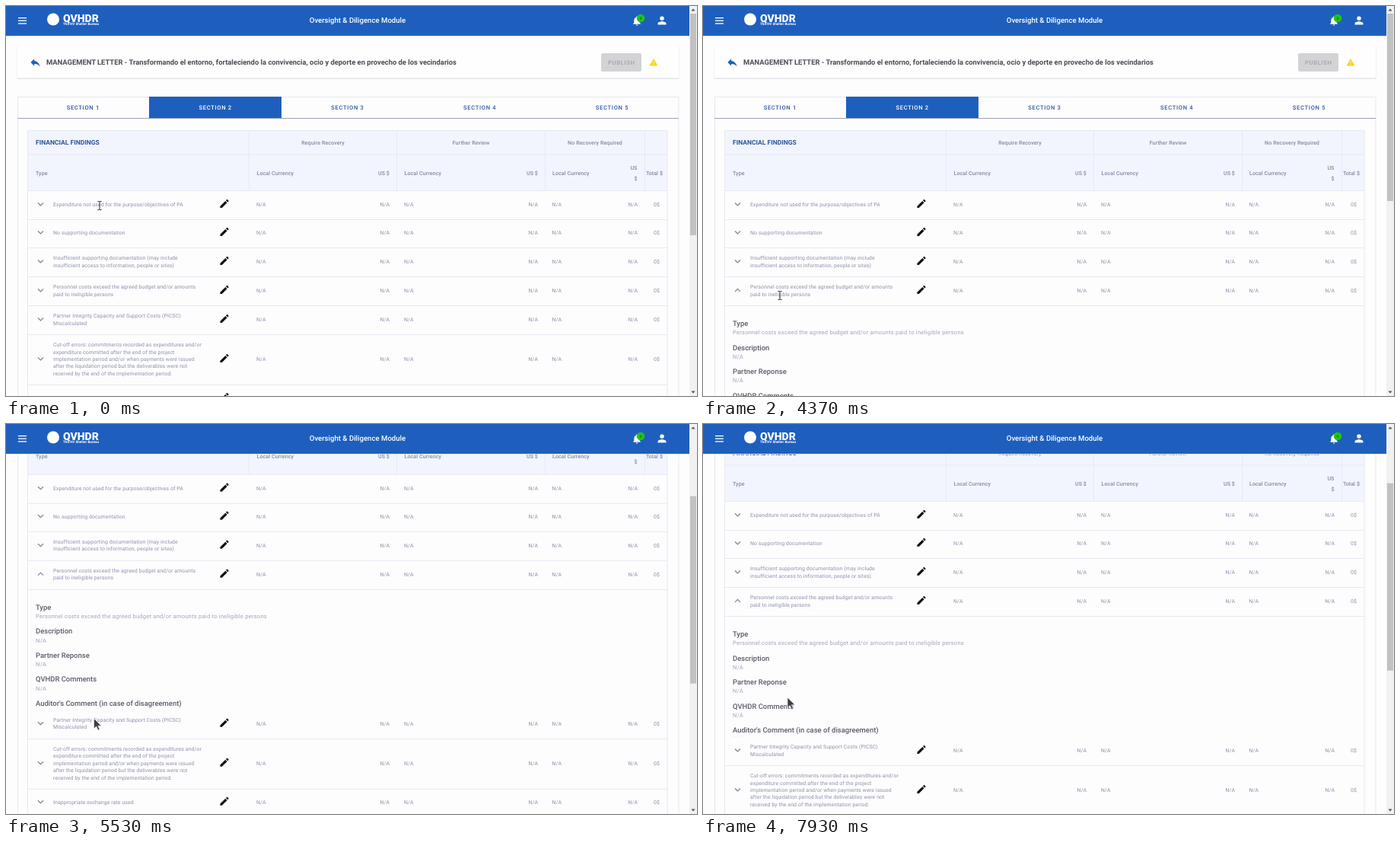
These frames come from a looping animation (908x512 px, 8 s). An HTML page:

```html
<!DOCTYPE html>
<html lang="en">
<head>
<meta charset="utf-8">
<title>Management letter</title>
<style>
  html, body { margin: 0; width: 100%; height: 100%; overflow: hidden; background: #fdfdfe; }
  svg { display: block; width: 908px; height: 512px; font-family: Roboto, sans-serif; text-rendering: geometricPrecision; }
  .cell { font-size: 6.9px; letter-spacing: .016em; fill: #8d90aa; }
  .head { font-size: 7.1px; font-weight: 500; letter-spacing: .012em; fill: #8588a0; }
  .button { font-size: 7.57px; font-weight: 500; letter-spacing: .0892em; }
  .label { font-size: 9.46px; font-weight: 500; fill: #5a5b68; }
  .body { font-size: 7.57px; letter-spacing: .03125em; fill: #a2a5bb; }
  .rule { stroke: #e7e9f1; stroke-width: 1; fill: none; }
  .chevron { stroke: #7c7e92; stroke-width: 1.1; fill: none; }
</style>
</head>
<body>
<svg id="stage" viewBox="0 0 908 512"></svg>
<script>
const LOOP = 8000, DETAIL = 158, BLUE = '#1e5fbe', PAGE = '#fdfdfe';

const text = (x, y, str, cls, attrs = '') =>
  `<text x="${x}" y="${y}" class="${cls}" ${attrs}>${str.replace(/&/g, '&amp;')}</text>`;
const rect = (x, y, w, h, fill, attrs = '') =>
  `<rect x="${x}" y="${y}" width="${w}" height="${h}" fill="${fill}" ${attrs}/>`;
const line = d => `<path class="rule" d="${d}"/>`;
const icon = (x, y, scale, d, fill) =>
  `<path transform="translate(${x} ${y}) scale(${scale}) translate(-12 -12)" d="${d}" fill="${fill}"/>`;
const END = 'text-anchor="end"', MID = 'text-anchor="middle"';

const PENCIL = 'M3 17.2V21h3.8L17.8 9.9l-3.7-3.7zM20.7 7a1 1 0 0 0 0-1.4l-2.3-2.3a1 1 0 0 0-1.4 0l-1.8 1.8 3.7 3.7z';
const REPLY = 'M10 9V5l-7 7 7 7v-4.1c5 0 8.5 1.6 11 5.1-1-5-4-10-11-11z';
const BELL = 'M12 22a2 2 0 0 0 2-2h-4a2 2 0 0 0 2 2zM18 16v-5c0-3-1.6-5.6-4.5-6.3V4a1.5 1.5 0 0 0-3 0v.7C7.6 5.4 6 7.9 6 11v5l-2 2v1h16v-1z';
const PERSON = 'M12 12a4 4 0 1 0 0-8 4 4 0 0 0 0 8zM12 14c-2.7 0-8 1.3-8 4v2h16v-2c0-2.7-5.3-4-8-4z';
const WARNING = 'M1 21h22L12 2zM13 18h-2v-2h2zM13 14h-2v-4h2z';

const rows = [
  [260.5, 280.5, ['Expenditure not used for the purpose/objectives of PA']],
  [297.5, 317.5, ['No supporting documentation']],
  [335.5, 355.5, ['Insufficient supporting documentation (may include', 'insufficient access to information, people or sites)']],
  [373.5, 393.5, ['Personnel costs exceed the agreed budget and/or amounts', 'paid to ineligible persons']],
  [411.5, 431.5, ['Partner Integrity Capacity and Support Costs (PICSC)', 'Miscalculated']],
  [463.5, 497.5, ['Cut-off errors: commitments recorded as expenditures and/or',
    'expenditure committed after the end of the project',
    'implementation period and/or when payments were issued',
    'after the liquidation period but the deliverables were not',
    'received by the end of the implementation period.']],
  [514.5, 534.5, ['Inappropriate exchange rate used']],
];

function row([mid, bottom, lines], i) {
  const base = mid + 2.5;
  return `<path class="chevron" id="chevron${i}" d="M42 ${mid - 2}l3.5 3.5 3.5-3.5"/>`
    + lines.map((s, n) => text(62, base + 9.45 * (n - (lines.length - 1) / 2), s, 'cell')).join('')
    + icon(287, mid - 1, .62, PENCIL, '#101014')
    + [329, 523, 717.5].map(x => text(x, base, 'N/A', 'cell')).join('')
    + [504, 699, 830].map(x => text(x, base, 'N/A', 'cell', END)).join('')
    + text(859, base, '0$', 'cell', END)
    + line(`M28 ${bottom}H869`);
}

function details() {
  const entries = [['Type', 'Personnel costs exceed the agreed budget and/or amounts paid to ineligible persons'],
    ...['Description', 'Partner Reponse', 'QVHDR Comments', "Auditor's Comment (in case of disagreement)"].map(s => [s, 'N/A'])];
  return entries.map(([label, value], i) =>
    text(39, 420 + 31.5 * i, label, 'label') + text(39, 431.4 + 31.5 * i, value, 'body')).join('');
}

function titleCard() {
  return rect(14.5, 53, 870, 43, '#e4e5ea', 'rx="2"') + rect(15, 53, 869, 41.5, '#fefefe', 'rx="2"')
    + icon(38.5, 74, .67, REPLY, BLUE)
    + text(53, 77, 'MANAGEMENT LETTER - Transformando el entorno, fortaleciendo la convivencia, ocio y deporte en provecho de los vecindarios',
      '', 'font-size="9.4" font-weight="700" fill="#4b4c56"')
    + rect(782, 62, 53, 24, '#d3d3d6', 'rx="2"')
    + text(808.8, 76.8, 'PUBLISH', 'button', MID + ' fill="#a3a4a8"')
    + icon(851, 74, .5, WARNING, '#fbd418');
}

function tabs() {
  const width = 173.8;
  return line('M15.5 119V900M884 119V900M15 119.5H884') + rect(188, 119, 174, 28, BLUE)
    + [1, 2, 3, 4, 5].map(n => text(101.3 + width * (n - 1), 136, 'SECTION ' + n, 'button',
      `${MID} fill="${n === 2 ? '#fff' : '#34589c'}"`)).join('')
    + rect(15, 147, 869, 1, '#9ea2b0');
}

function tableHead() {
  const at = (x, y, s, attrs) => text(x, y, s, 'head', attrs);
  return rect(28, 163, 841, 79.5, '#f2f5fd')
    + line('M28.5 900V163.5H869V900M28 195H869M28 242.5H869M319.5 163V242M513.5 163V242M708.5 163V242M839.5 163V242')
    + text(39, 182, 'FINANCIAL FINDINGS', '', 'font-size="8.5" font-weight="700" fill="#2c559e"')
    + at(416.5, 181.5, 'Require Recovery', MID) + at(611, 181.5, 'Further Review', MID) + at(774, 181.5, 'No Recovery Required', MID)
    + at(39, 221.5, 'Type') + [329.5, 523.5, 718].map(x => at(x, 221.5, 'Local Currency')).join('')
    + at(504, 221.5, 'US $', END) + at(699, 221.5, 'US $', END)
    + at(829.5, 214.5, 'US', END) + at(829.5, 228.5, '$', END) + at(863, 221.5, 'Total $', END);
}

function appBar() {
  return rect(0, 39, 898, 1, '#d9dde8') + rect(0, 0, 898, 39, BLUE)
    + [15, 18.7, 22.4].map(y => rect(16, y, 11, 1.3, '#fff')).join('')
    + '<circle cx="62" cy="17.5" r="8" fill="#fff"/>'
    + text(75, 20.5, 'QVHDR', '', 'font-size="14" font-weight="900" fill="#fff"')
    + text(75, 25.3, 'The HV Shelter Bureau', '', 'font-size="4.6" font-weight="700" fill="#fff"')
    + text(462, 22.2, 'Oversight & Diligence Module', '', MID + ' font-size="9.6" font-weight="500" fill="#fff"')
    + icon(829, 19.5, .62, BELL, '#fff') + '<circle cx="834" cy="16" r="5.3" fill="#20c414"/>'
    + text(834, 18, '6', '', MID + ' font-size="5.5" fill="#0d6b1a"')
    + icon(862, 19, .68, PERSON, '#fff');
}

document.getElementById('stage').innerHTML = `
  <defs><clipPath id="reveal"><rect id="revealBox" x="28" y="394" width="841" height="0"/></clipPath></defs>
  ${rect(0, 0, 908, 512, PAGE)}
  <g id="page">
    ${titleCard()}${tabs()}${tableHead()}
    ${rows.slice(0, 4).map(row).join('')}
    <g clip-path="url(#reveal)">${details()}</g>
    <g id="lower">${rows.slice(4).map((r, i) => row(r, i + 4)).join('')}</g>
  </g>
  ${appBar()}
  ${rect(898, 0, 10, 512, '#f1f1f2')}
  <path d="M900.5 6.5l2.5-3 2.5 3zM900.5 505.5l2.5 3 2.5-3z" fill="#505052"/>
  ${rect(899, 10, 8, 291, '#c1c1c3', 'id="thumb"')}
  <g id="pointer">
    <path id="arrow" d="M0 0V13.5L3.2 10.6 5.4 15.5 7.6 14.5 5.4 9.7H9.8Z" fill="#3e3e46" stroke="#f4f4f8" stroke-width=".7"/>
    <path id="beam" d="M-2.5-5.5H-.8L0-5 .8-5.5H2.5M0-5V5M-2.5 5.5H-.8L0 5 .8 5.5H2.5" fill="none" stroke="#303036"/>
  </g>`;

const pointerPath = [[0, 123, 262], [930, 123, 262], [1730, 124, 303], [1770, 124, 303], [2320, 50, 476], [2570, 32, 444],
  [2600, 32, 444], [2780, 22, 438], [3230, 110, 303], [3530, 110, 303], [3880, 45, 372], [4080, 45, 372], [4330, 101, 380],
  [4370, 101, 380], [4620, 111, 389], [5200, 111, 389], [5860, 120, 384], [6030, 120, 384], [6830, 111, 361], [7700, 111, 361], [7900, 111, 359]];
const scrollPath = [[4580, 0], [5030, 116], [5550, 176.5], [7050, 176.5], [7400, 168], [7670, 141]];
const expandPath = [[3960, 0], [4160, 1]];
// Times at which the pointer turns from text beam to arrow and back.
const shapeSwitches = [1850, 2950, 3620, 4180, 4480, 6900, 7700];

function sample(path, t) {
  const next = path.findIndex(key => key[0] > t);
  if (next === 0) return path[0].slice(1);
  if (next < 0) return path[path.length - 1].slice(1);
  const a = path[next - 1], b = path[next];
  const u = (t - a[0]) / (b[0] - a[0]), k = u * u * (3 - 2 * u);
  return a.slice(1).map((v, i) => v + (b[i + 1] - v) * k);
}

const el = id => document.getElementById(id);
const set = (id, name, value) => el(id).setAttribute(name, value);

function draw(t) {
  const [scroll] = sample(scrollPath, t), [open] = sample(expandPath, t), [x, y] = sample(pointerPath, t);
  const grown = DETAIL * open, pageHeight = 866 + grown, ratio = 492 / pageHeight;
  set('page', 'transform', `translate(0 ${-scroll})`);
  set('lower', 'transform', `translate(0 ${grown})`);
  set('revealBox', 'height', grown);
  set('chevron3', 'transform', `rotate(${180 * open} 45.5 373.2)`);
  set('thumb', 'y', 10 + scroll * ratio);
  set('thumb', 'height', 512 * ratio);
  const isArrow = shapeSwitches.filter(s => s <= t).length % 2 === 1;
  set('pointer', 'transform', `translate(${x} ${y})`);
  set('arrow', 'visibility', isArrow ? 'visible' : 'hidden');
  set('beam', 'visibility', isArrow ? 'hidden' : 'visible');
}

let start;
function tick(now) {
  start ??= now;
  draw((now - start) % LOOP);
  requestAnimationFrame(tick);
}
draw(0);
requestAnimationFrame(tick);
</script>
</body>
</html>
```
